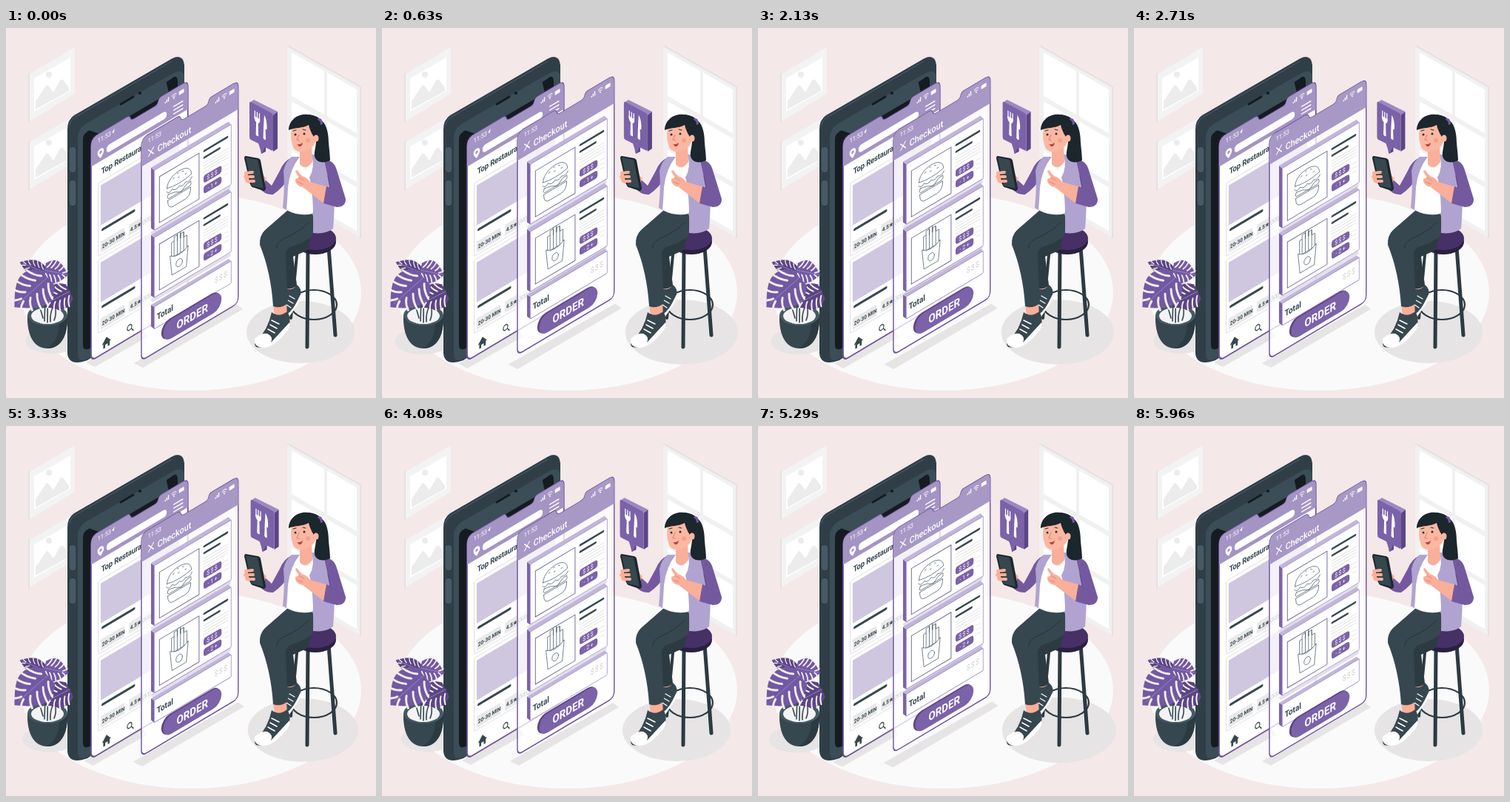
Write an HTML page that moves like this. It is 500 px wide and 500 px high and loops after 6000 ms.

```html
<!DOCTYPE html>
<html lang="en">
<head>
<meta charset="utf-8">
<title>Checkout</title>
<style>
html,body{margin:0;width:100%;height:100%;overflow:hidden;background:#f4e8e8}
svg{display:block;width:100vw;height:100vh}
text{font-family:Roboto,"Open Sans",sans-serif}
.ln{fill:none;stroke-linecap:round;stroke-linejoin:round}
.ink{stroke:#455a64;stroke-width:.7}
</style>
</head>
<body>
<svg viewBox="0 0 500 500">
<defs>
  <path id="sheet" d="M0 10Q0 1 8 0H56q4 0 5 4t6 4H99q5 0 6-4t5-4H143Q151 0 151 8V292Q151 300 143 300H8Q0 300 0 292Z"/>
  <path id="head" d="M0 38V10Q0 1 8 0H56q4 0 5 4t6 4H99q5 0 6-4t5-4H143Q151 0 151 8V38Z"/>
  <g id="status" fill="#fff">
    <text x="10" y="11.500" font-size="8.500">11:53</text>
    <path d="M115 12v-2h1.500v2zm2.500 0v-4h1.500v4zm2.500 0V6h1.500v6z"/>
    <path class="ln" stroke="#fff" d="M126 8q3.500-3 7 0m-5.500 2q2-1.500 4 0"/>
    <circle cx="129.500" cy="12" r="1"/>
    <rect x="137" y="7" width="8" height="5" rx="1"/>
  </g>
  <g id="picture">
    <path fill="#e4e0e0" d="M30 62l3-2v67l-3-1z"/>
    <path fill="#f3f3f3" d="M32 62L93 26v63L32 126z"/>
    <path fill="#fff" d="M38 68L87 40v45L38 113z"/>
    <path fill="#ececec" d="M40 110V99l14-21q2-2 4 1l6 8 9-16q3-3 5 0l7 10v4z"/>
    <circle cx="58" cy="63" r="4" fill="#ececec"/>
  </g>
  <g id="place">
    <rect x="11" y="66" width="131" height="99" rx="2" fill="#fff" stroke="#dcd9e2" stroke-width=".8"/>
    <rect x="15" y="71" width="123" height="54" fill="#cfc7e0"/>
    <path class="ln" stroke="#37474f" stroke-width="3.600" d="M18 132H67"/>
    <path fill="#e9e9e9" d="M15 147h37v15H15zM59 147h39v15H59zM111 147h20v15h-20z"/>
    <g font-size="7.400" font-weight="600" fill="#37474f">
      <text x="17" y="157.500">20-30 MIN</text>
      <text x="61" y="157.500">4.5★ (53)</text>
      <text x="114" y="157.500">$$$</text>
    </g>
  </g>
  <g id="slab">
    <path fill="#7c62a8" d="M20 53l-5-6V129l5 5z"/>
    <path fill="#c1b6d9" d="M20 53l-5-6H136l4 6z"/>
    <rect x="20" y="53" width="120" height="81" rx="1" fill="#fff" stroke="#9c89c2" stroke-width=".9"/>
    <rect x="28" y="66" width="62" height="62" fill="#fff" stroke="#53497a" stroke-width=".9"/>
    <path class="ln" stroke="#37474f" stroke-width="2.800" d="M98 67h36M98 76h24"/>
    <path class="ln" stroke="#dcdcdc" stroke-width=".8" d="M97 83h38M97 87h38M97 91h38M97 95h38M130 104h5M130 110h5M130 116h5"/>
    <rect x="97" y="100" width="28" height="10.500" rx="3.500" fill="#7c62a8"/>
    <rect x="97" y="114.500" width="28" height="10.500" rx="3.500" fill="#7c62a8"/>
    <text x="111" y="108.300" font-size="8" letter-spacing="1.500" text-anchor="middle" fill="#fff">$$$</text>
  </g>
</defs>

<rect width="500" height="500" fill="#f4e8e8"/>
<ellipse cx="250" cy="357" rx="230" ry="133" fill="#fafafa"/>

<use href="#picture"/>
<use href="#picture" y="92"/>

<!-- window -->
<path fill="#e6e1e1" d="M379 25l4-1 97 55v205l-4-1z"/>
<path fill="#f1f1f1" d="M380 25l98 55V283l-98-56z"/>
<g id="panes" fill="#fff"></g>

<!-- floor shadows -->
<g id="shadows" fill="#e6e4e4">
  <ellipse cx="398" cy="411" rx="73" ry="42"/>
  <ellipse cx="62" cy="423" rx="36" ry="17"/>
  <path d="M108 452l12 6 72-41-6-8zM173 453l12 6 135-79-8-6z"/>
</g>

<!-- big phone -->
<path fill="#303f47" d="M83 137Q83 124 92 118L224 41.500Q239 34 241 50V362L110 449Q85 458 83 440Z"/>
<path fill="#3b4d56" d="M97 147Q98 136 107 130L226 61Q240 54 241 66V362L110 447Q97 453 97 440Z"/>
<path class="ln" stroke="#4b606a" d="M86 131Q88 123 96 119L224 45"/>
<path fill="#141c21" d="M104 152Q104 143 110 140L223 69Q232 61 232 73V366L113 433Q104 437 104 428Z"/>
<path fill="#3b4d56" d="M106 136L216 70l4 18-94 55z"/>
<path class="ln" stroke="#141c21" stroke-width="3" d="M155 103l17-10"/>
<circle cx="181" cy="88" r="2" fill="#141c21"/>
<rect x="85" y="160" width="10" height="36" rx="5" fill="#455a64" stroke="#263238"/>
<rect x="85" y="205" width="10" height="36" rx="5" fill="#455a64" stroke="#263238"/>

<!-- restaurant list -->
<g transform="matrix(.866 -.515 0 1 115 149.500)">
  <use href="#sheet" fill="#fff" stroke="#6b5099" stroke-width="2"/>
  <use href="#head" fill="#a494c4"/>
  <use href="#status"/>
  <path fill="#fff" d="M32 9l5-4-2 6-1-2z"/>
  <path fill="#fff" d="M15 34q-5-5-5-8a5 5 0 0 1 10 0q0 3-5 8zm0-10a2 2 0 1 0 .1 0z"/>
  <rect x="24" y="22.500" width="94" height="10" rx="5" fill="#fff"/>
  <path class="ln" stroke="#fff" stroke-width="1.600" d="M129 23h14m-14 5h14m-14 5h14"/>
  <text x="16" y="56.500" font-size="11" font-weight="700" letter-spacing="-.2" fill="#37474f">Top Restaurants</text>
  <use href="#place"/>
  <use href="#place" y="104"/>
  <path fill="#fff" d="M2 272H149v19q0 6-6 7H8q-6-1-6-7z"/>
  <path fill="#37474f" d="M17 288l7-8 7 8h-2v6h-3v-4h-4v4h-3v-6z"/>
  <g class="ln" stroke="#37474f" stroke-width="1.300">
    <circle cx="60" cy="286" r="3.600"/><path d="M63 289l3 4M98 292l-4-5q0-5 4-2 4-3 4 2z"/>
  </g>
</g>

<!-- checkout -->
<g id="checkout"><g transform="matrix(.866 -.515 0 1 183 149.500)">
  <use href="#sheet" fill="#fff" fill-opacity=".76" stroke="#6b5099" stroke-width="1.600"/>
  <use href="#head" fill="#a494c4" fill-opacity=".96"/>
  <use href="#status"/>
  <path class="ln" stroke="#fff" stroke-width="1.300" d="M11 21l8 9m0-9l-8 9"/>
  <text x="25" y="31.500" font-size="12.400" font-weight="500" fill="#fff">Checkout</text>
  <path fill="#d9d3e6" opacity=".7" d="M14 134h125v5H18zM14 225h125v5H18z"/>
  <use href="#slab"/>
  <use href="#slab" y="91"/>
  <g font-size="8" text-anchor="middle" fill="#fff">
    <text x="111" y="122.800">- 1 +</text><text x="111" y="213.800">- 2 +</text>
  </g>
  <g class="ln ink" transform="translate(-1 -2)">
    <path d="M41 90C41 71 79 71 79 90Q60 95 41 90ZM40 94q4 6 9 1 6 6 11 1 5 5 10 0 6 4 10-2M43 99l10 2 10 5 8-6 7-1q2 5-2 6H44q-4-1-1-6M42 107H78q0 12-9 12H51q-9 0-9-12M50 82l2-1m5-3l2 0m6 1l2 1m-9 4l2 0m9 1l2 0"/>
    <path fill="#fff" d="M48 187v-20h4v-6h5v8-10h5v9-6h5v7h5v18z"/>
    <path d="M52 167v20m5-26v26m5-26v26m5-25v25"/>
    <path fill="#fff" d="M46 184Q60 194 74 184L71 211H49Z"/>
    <circle cx="60" cy="200" r="5"/>
  </g>
  <g id="total">
    <path fill="#7c62a8" d="M20 236l-5-5v29l5 6z"/>
    <path fill="#c1b6d9" d="M20 236l-5-5H136l4 5z"/>
    <rect x="20" y="236" width="120" height="30" rx="1" fill="#fff" stroke="#9c89c2" stroke-width=".9"/>
    <text x="24" y="256" font-size="11.500" font-weight="600" fill="#37474f">Total</text>
    <text x="114" y="253" font-size="10" letter-spacing="1.500" fill="#cfcfcf">$$$</text>
  </g>
  <rect x="31" y="266" width="92" height="26" rx="13" fill="#5b4585"/>
  <rect x="34" y="268" width="91" height="26" rx="13" fill="#7c62a8"/>
  <text x="79.500" y="286.500" font-size="15.500" font-weight="600" text-anchor="middle" fill="#fff">ORDER</text>
</g></g>

<!-- food sign -->
<g id="sign">
  <path fill="#5b4585" d="M361 117l6-4v50l-6 4z"/>
  <path fill="#9c89c2" d="M329 101l6-4 32 16-6 5z"/>
  <path fill="#5b4585" d="M345 170l6-3v-9l-8 2z"/>
  <path fill="#7c62a8" d="M331 100l28 15q2 1 2 4v45q0 3-3 1l-8-4-4 9-5-14-10-5q-2-1-2-4v-45q0-3 2-2z"/>
  <g transform="matrix(.866 .5 0 1 329 99)">
    <path class="ln" stroke="#fff" stroke-width="1.500" d="M8.500 9v9m3.500-9v9m3.500-9v9"/>
    <path fill="#fff" d="M7.500 16h9q0 6-3 7l.5 17q-2 2-4 0l.5-17Q7.500 22 7.500 16zM23 7q5 5 4 18h-2l.5 14q-2 2-4 0l.5-15z"/>
  </g>
</g>

<!-- plant -->
<path fill="#37474f" d="M29 388C28 416 38 433 56 433S84 416 83 388Z"/>
<path fill="#2c3a42" d="M54 433C74 434 84 416 83 388L72 399Q72 424 54 433Z"/>
<ellipse cx="56" cy="388" rx="27" ry="14" fill="#455a64"/>
<ellipse cx="56" cy="389" rx="22" ry="11" fill="#f3f3f3"/>
<path class="ln" stroke="#37474f" stroke-width="1.600" d="M52 396Q54 360 50 330M56 398Q57 350 54 330M60 397Q58 375 80 356M65 395Q68 388 67 380M50 392L46 378"/>
<g id="leaves" class="ln"></g>

<!-- stool -->
<g class="ln" stroke="#2c3a42" stroke-width="5">
  <path d="M394 296L385 392" stroke-width="4"/>
  <ellipse cx="416" cy="374" rx="31" ry="20" stroke-width="2.200"/>
  <path d="M408 300L407 431M436 296L445 415"/>
</g>
<ellipse cx="418" cy="289" rx="28" ry="17" fill="#2a2040"/>
<ellipse cx="418" cy="284" rx="28" ry="16" fill="#463066"/>

<!-- woman -->
<path fill="#f9af99" d="M380 340l12-2 2 16-12 3z"/>
<path fill="#37474f" d="M379 352q8 4 14-5 6 4 6 13-3 14-14 24-6 9-12 11l-2-6z"/>
<path fill="#fff" d="M399 358q1 10-10 23-8 13-16 16l-1-4q14-9 20-21z"/>
<path class="ln" stroke="#fff" stroke-width="1.300" d="M383 362l7 4m-9 2l7 4m-9 2l6 4"/>
<path fill="#2c3a42" d="M392 252Q408 256 414 274L408 300Q397 305 388 309L393 348Q386 354 376 352L363 294Q365 282 374 276Z"/>
<path fill="#f9af99" d="M361 372l18-1 1 17q-8 6-17 2z"/>
<path fill="#37474f" d="M381 246Q397 242 414 249Q418 264 414 281Q404 290 384 296Q377 300 378 309L381 372Q371 380 361 376Q358 330 343 293Q342 281 350 273Z"/>
<path class="ln" stroke="#263238" d="M410 262q-14 14-35 23-10 5-9 13"/>
<path fill="#37474f" d="M359 384q10 8 21-1 5 8 3 17-8 12-20 22-12 12-25 9-4-4 1-9 15-14 20-38z"/>
<path fill="#fff" d="M336 420q10-9 17-7 9 4 5 12l25-27q1 7-4 13-16 19-29 21-13 0-14-8z"/>
<path class="ln" stroke="#fff" stroke-width="1.600" d="M359 395l10 5m-12 1l9 5m-12 1l9 5"/>

<path fill="#fff" d="M380 190Q386 180 397 178L413 180 420 205 414 251Q396 255 379 246Q383 220 380 190Z"/>
<path fill="#74599f" d="M386 175Q375 180 370 193L359 213 346 201 342 216Q350 226 361 225Q374 216 382 203Z"/>
<path fill="#b0a3d0" d="M386 174L397 174Q384 190 381 215L379 246 374 243Q377 215 375 193Q378 180 386 174Z"/>
<path fill="#f9af99" d="M397 160L413 158 414 181Q405 194 397 184Z"/>
<path fill="#b0a3d0" d="M413 171Q431 171 438 183Q447 215 442 271Q432 279 415 277Q416 222 410 202Q418 188 413 171Z"/>
<path fill="#f9af99" d="M436 215L411 208Q407 202 400 200L393 192Q390 192 392 196L396 202 391 204Q390 213 401 215L431 238Z"/>
<path class="ln" stroke="#d97f6b" stroke-width=".8" d="M396 202l7 4m-9 2l7 3"/>
<path fill="#74599f" d="M430 178Q443 178 447 192L459 231Q459 242 447 242L429 237 433 214 438 216Z"/>
<path class="ln" stroke="#5b4585" d="M438 216l-3-16"/>

<!-- hand and handset -->
<path fill="#f9af99" d="M324 194q9-5 18 0l10 9-6 14-13-5-9-4q-3-7 0-14z"/>
<path fill="#1e282e" d="M324 173l17 3q2 1 3 3l7 37q0 4-3 4l-15-5q-2-1-3-4l-8-35q0-3 2-3z"/>
<path fill="#37474f" d="M324 175l16 3 8 39-16-4z"/>
<path class="ln" stroke="#f9af99" stroke-width="4" d="M324 196l9-1m-10 6l11 0m-8 6l9 0"/>

<!-- head -->
<path fill="#1c262d" d="M423 124C433 126 436 142 436 155 437 166 438 174 438 179 430 183 421 182 418 176 416 172 417 167 418 162Z"/>
<path fill="#fbb7a1" d="M387 132C384 142 385 151 387 158 389 167 398 169 405 166 413 163 419 158 420 146L418 126 392 125Z"/>
<path fill="#1c262d" d="M382 138C382 125 394 115 408 117 421 117 432 126 433 141 433 152 429 160 423 164 420 162 419 158 420 152 415 147 411 139 409 131 400 136 391 134 382 138Z"/>
<ellipse cx="419" cy="149" rx="3.500" ry="4.500" fill="#fbb7a1"/>
<path fill="#74599f" d="M422 122q6-1 6 8l-3 1q0-6-4-7z"/>
<circle cx="391" cy="144" r="1.500" fill="#263238"/>
<circle cx="403" cy="143" r="1.500" fill="#263238"/>
<path class="ln" stroke="#263238" d="M388 139l4-1m9-1l4 1"/>
<path class="ln" stroke="#d97f6b" d="M396 144l-3 7 3 1"/>
<circle cx="408" cy="152" r="3" fill="#f2917d" opacity=".6"/>
<path fill="#b4433f" d="M393 157q4 1 8-2-1 6-5 5z"/>
</svg>
<script>
const $ = id => document.getElementById(id);
const LOOP = 6000, BEAT = 1500;

// Window: three rows of two panes
for (let i = 0; i < 6; i++) {
  const x = i % 2 ? 434 : 386, w = i % 2 ? 40 : 44;
  const y = 33 + (x - 386) * .57 + (i >> 1) * 66;
  $('panes').innerHTML += `<path d="M${x} ${y}l${w} ${w * .57}v59l${-w} ${-w * .57}z"/>`;
}

// Leaf from its base towards its tip, cut by curved slits on both sides
function leaf(x, y, turn, length, half, fill) {
  const width = t => half * Math.sin(Math.PI * (.2 + .8 * t));
  let outline = 'M0 0', slits = '';
  for (const s of [1, -1]) {
    const edge = [];
    for (let t = 0; t <= 1; t += .1) edge.push(`${s * width(t)} ${-t * length}`);
    outline += 'L' + (s > 0 ? edge : edge.reverse()).join('L');
    for (let t = .2; t < .95; t += .17) {
      const w = s * width(t);
      slits += `M${w * 1.1} ${-(t + .04) * length}Q${w * .6} ${-t * length} ${w * .3} ${-(t - .12) * length}`;
    }
  }
  $('leaves').innerHTML += `<g transform="translate(${x} ${y})rotate(${turn})">
    <path d="${outline}Z" fill="${fill}"/>
    <path d="${slits}" stroke="#f5ecec" stroke-width="${half / 9}"/>
    <path d="M0 0V${-length * .9}" stroke="#a294c4" stroke-width=".7"/></g>`;
}
leaf(52, 330, -68, 36, 11, '#5b4585');
leaf(52, 327, 102, 33, 16, '#7259a3');
leaf(86, 356, -117, 40, 18, '#5b4585');
leaf(56, 337, -132, 60, 26, '#7259a3');

// Value at phase f of evenly or freely placed [phase, value] keys
const ease = p => p * p * p * (p * (6 * p - 15) + 10);
function tween(keys, f) {
  const i = keys.findIndex(k => k[0] > f);
  const [a, from] = keys[i - 1], [b, to] = keys[i];
  return from + (to - from) * ease((f - a) / (b - a));
}
const shake = [0, -1, 2, -4, 4, -4, 4, -4, 2, -1, 0].map((v, i) => [i / 10, v]);
const pulse = [[0, 0], [.14, 1], [.28, 0], [.5, 1], [.7, 0], [1, 0]];

function draw() {
  const t = performance.now() % LOOP, beat = t % BEAT / BEAT;
  const lift = (1 - Math.cos(2 * Math.PI * beat)) / 2;
  const size = 1 + .055 * tween(pulse, beat);
  const move = (id, value) => $(id).setAttribute('transform', value);
  move('checkout', `translate(0 ${-8.5 * lift})`);
  move('total', `translate(0 ${1.5 - 6 * lift})`);
  move('sign', `translate(${2.1 * tween(shake, t / LOOP)} 0)`);
  move('shadows', `translate(234 412)scale(${size})translate(-234 -412)`);
  requestAnimationFrame(draw);
}
draw();
</script>
</body>
</html>
```
